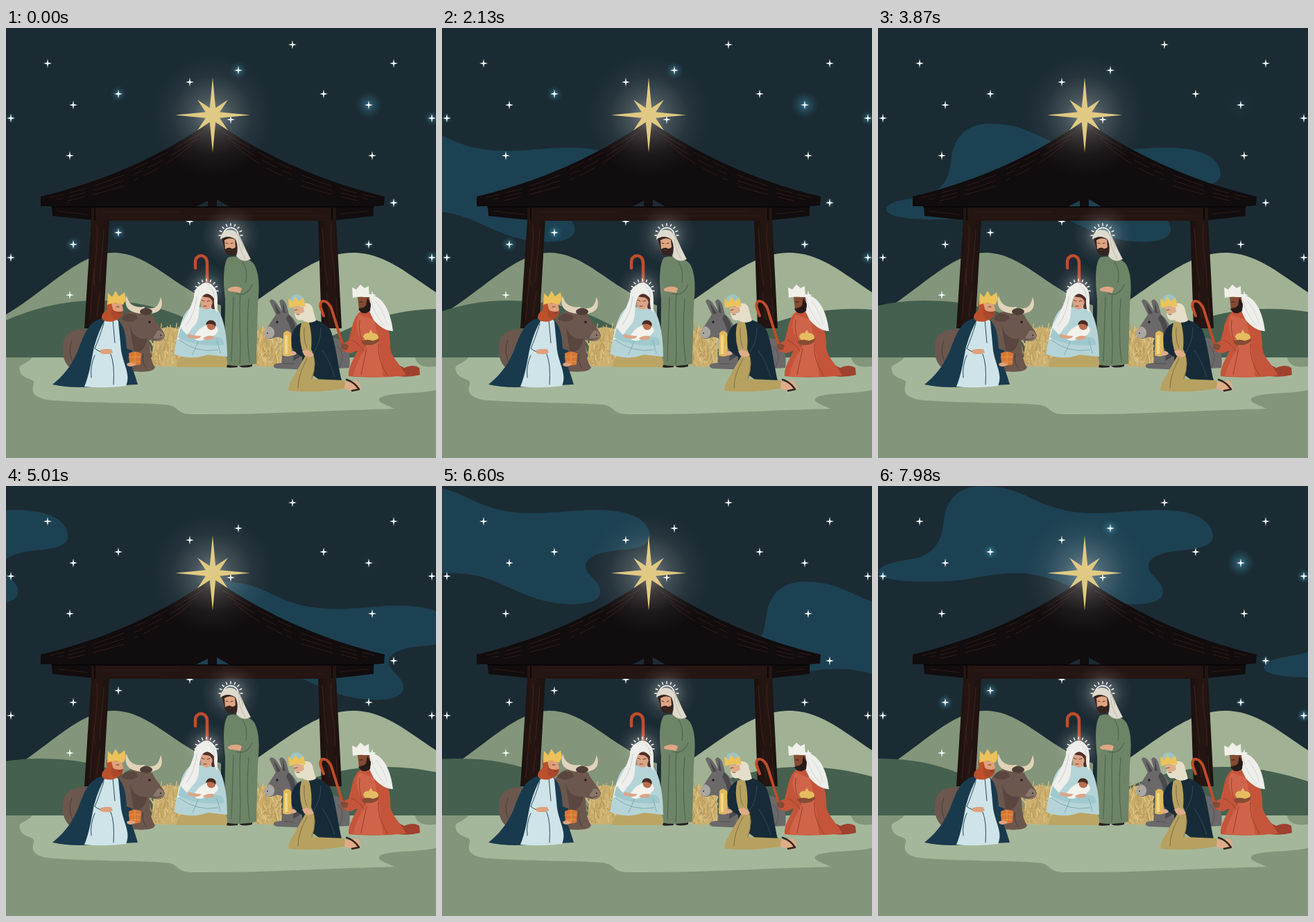
Recreate the animation shown at these times as an HTML page. Size 620 px wide and 620 px high, loop 8 s.

```html
<!DOCTYPE html>
<html lang="en">
<head>
<meta charset="utf-8">
<title>Nativity night</title>
<style>
html,body{margin:0;width:100%;height:100%;overflow:hidden;background:#1b2b33}
svg{display:block;width:100vw;height:100vh}
.ln{fill:none;stroke-linecap:round;stroke-linejoin:round}
</style>
</head>
<body>
<svg viewBox="0 0 620 620">
<defs>
  <radialGradient id="white"><stop offset="0" stop-color="#fff" stop-opacity=".8"/><stop offset=".3" stop-color="#eee" stop-opacity=".38"/><stop offset=".65" stop-color="#ccc" stop-opacity=".12"/><stop offset="1" stop-color="#aaa" stop-opacity="0"/></radialGradient>
  <radialGradient id="blue"><stop offset="0" stop-color="#4f9fbc" stop-opacity=".75"/><stop offset=".45" stop-color="#357f9c" stop-opacity=".38"/><stop offset="1" stop-color="#2a6580" stop-opacity="0"/></radialGradient>
  <linearGradient id="wood"><stop offset="0" stop-color="#1a100e"/><stop offset=".5" stop-color="#261612"/><stop offset="1" stop-color="#1c1210"/></linearGradient>
  <path id="cloud" d="M150 0C118 0 99 18 95 48C92 78 84 96 55 104C28 109 0 113 1 124C3 139 62 139 105 137C145 134 165 124 207 126C270 129 292 165 360 170C392 172 411 166 411 152C411 137 391 130 390 116C390 99 418 94 446 92C470 89 483 84 483 72C481 48 455 37 420 35C370 32 330 44 280 37C222 28 210 0 150 0Z"/>
  <path id="spark" d="M0-6.5L1-1.2L6 0L1 1.2L0 6.5L-1 1.2L-6 0L-1-1.2Z"/>
</defs>

<rect width="620" height="620" fill="#1b2b33"/>
<g fill="#1c4152"><use id="low" href="#cloud"/><use id="high" href="#cloud"/></g>

<!-- land -->
<path fill="#83957a" d="M0 413C60 378 105 324 155 324C208 324 245 378 310 400V476H0Z"/>
<path fill="#a1b193" d="M330 412C390 380 440 324 500 324C546 324 578 354 620 381V476H330Z"/>
<g id="hills" fill="#45604f">
  <path d="M-60 450C0 419 58 393 130 393C200 393 245 408 300 440L330 476H-60Z"/>
  <path d="M410 476C480 437 540 405 628 405C690 405 740 420 790 440V476Z"/>
</g>
<rect y="475" width="620" height="145" fill="#83957a"/>
<path fill="#a5b79a" d="M38 475C30 486 17 483 20 494C23 508 42 504 40 513C37 523 36 534 68 537C130 541 185 540 230 543C252 545 243 557 270 557C365 558 450 552 561 549C545 542 531 538 541 532C560 525 596 528 620 522V488C602 490 592 486 590 475Z"/>
<g id="sky"></g>

<!-- stable -->
<g fill="url(#wood)">
  <path d="M123 276H149L140 433H113Z"/>
  <path d="M450 276H476L484 433H455Z"/>
</g>
<g class="ln" stroke="#432219" stroke-width="1">
  <path d="M131 285C134 320 124 350 128 372M141 290C139 325 136 338 135 365M127 345L121 420M136 380L131 415M456 288C459 320 458 338 464 371M469 284C465 315 476 343 474 375M462 382L467 420M476 390L478 425"/>
</g>
<path fill="#110c0d" fill-rule="evenodd" d="M298 133C313 143 338 160 374 179C429 208 484 228 546 243L545 256L530 257V271L476 277H126L67 271L66 257L50 257V243C112 228 167 208 222 179C258 160 283 143 298 133ZM273 258L291 249V258ZM304 247V258H323Z"/>
<path fill="#241512" d="M123 259H476V278H123Z"/>
<path class="ln" stroke="#070506" stroke-width="1.5" d="M66 258H530M128 259V277M470 259V277"/>
<path class="ln" stroke="#301a16" d="M140 265H250M270 271H460M150 273H225M330 264H440M75 264L118 269M482 268L522 264"/>
<g id="grain" class="ln" stroke="#331c18" stroke-dasharray="46 13 24 9"></g>

<circle cx="298" cy="126" r="88" fill="url(#white)" opacity=".55"/>
<path id="bigStar" fill="#e0ca83"/>

<g id="hay" class="ln" stroke-width="1.2"></g>

<!-- ox -->
<g>
  <path fill="#6b574d" d="M82 468C80 442 92 434 118 434H160C164 413 175 407 195 408L211 414C216 426 228 436 229 443C227 454 216 453 206 448C209 465 206 475 215 489C213 497 195 496 178 495H105C90 493 83 481 82 468Z"/>
  <path fill="#59473f" d="M188 414C177 409 170 412 167 420C177 426 184 423 190 419ZM178 428C183 444 190 449 204 448C201 462 194 470 184 466Z"/>
  <path fill="#8b766b" d="M219 436C228 436 231 445 225 450C219 453 212 450 213 445Z"/>
  <path fill="#e0d3b9" d="M197 412C177 411 169 402 174 386C177 400 187 404 200 402ZM207 412C223 411 228 402 223 388C220 402 215 405 205 404Z"/>
  <ellipse cx="202" cy="409" rx="9" ry="5" fill="#4f3e38"/>
  <circle cx="207" cy="424" r="1.8" fill="#231917"/><circle cx="223" cy="443" r="1" fill="#2c201d"/>
  <path class="ln" stroke="#4c3c36" d="M214 449Q219 450 224 447M198 470Q195 480 202 491M95 450Q87 469 100 488"/>
</g>

<!-- donkey -->
<g>
  <path fill="#6a6869" d="M389 413L380 394Q382 388 389 395L398 408L394 394Q398 387 404 398L408 413C420 421 424 444 440 447H475C492 451 498 470 495 490L440 493L391 491C382 489 385 483 397 483L401 450C395 444 388 445 383 448C373 449 370 439 375 435Z"/>
  <path fill="#4a494c" d="M386 396L396 411L391 413ZM399 394L403 411L399 410ZM407 413C422 424 416 449 426 473L414 480C416 455 413 434 404 419Z"/>
  <path fill="#aaa6a2" d="M379 430C388 432 390 442 383 447C373 449 370 440 375 435Z"/>
  <circle cx="391" cy="424" r="1.7" fill="#201e20"/><circle cx="377" cy="440" r=".9" fill="#333"/>
  <path class="ln" stroke="#505053" d="M478 459Q491 470 481 489M400 484H415"/>
</g>

<!-- shepherd's crook and standing father -->
<path class="ln" stroke="#bf4c2b" stroke-width="4.5" d="M290 374V339C290 325 273 325 273 338V346"/>
<circle cx="324" cy="299" r="43" fill="url(#white)" opacity=".72"/>
<g id="haloA" class="ln" stroke="#fff" stroke-width="1.4"></g>
<g>
  <path fill="#252020" d="M315 485H334V489Q320 491 315 488ZM337 484H355V488Q342 491 337 488Z"/>
  <path fill="#6d8467" d="M320 331C334 327 352 332 358 341C365 354 366 372 363 400L361 484Q338 490 315 485L316 390C313 365 313 340 320 331Z"/>
  <path class="ln" stroke="#4f674d" stroke-width="1.2" d="M338 382C335 420 340 455 337 484M355 370Q347 388 332 383M328 388L325 480M350 391Q346 440 351 481M341 337Q349 349 346 367"/>
  <path fill="#35231f" d="M311 304Q318 294 331 303L335 320Q332 329 323 328Q316 326 315 318Z"/>
  <path fill="#dfa684" d="M315 306Q322 301 330 305L331 316Q326 320 324 317Q320 316 316 319Z"/>
  <path fill="#dedacd" d="M309 305C309 289 329 286 337 300C344 315 348 325 353 333Q342 340 332 329Q336 316 331 305Q320 297 309 305Z"/>
  <path class="ln" stroke="#bdb9ab" d="M335 305Q337 321 345 333M330 293Q339 301 342 318"/>
  <path class="ln" stroke="#523027" d="M317 310L320 311M324 311L327 310M320 320.500L324 320.500"/>
  <path fill="#dfa684" d="M340 375Q329 370 320 376Q319 380 326 380L338 382Z"/>
</g>

<!-- mother and child -->
<circle cx="289" cy="377" r="37" fill="url(#white)" opacity=".75"/>
<g id="haloB" class="ln" stroke="#fff" stroke-width="1.4"></g>
<g>
  <path fill="#bba565" d="M255 470Q245 480 246 489H318Q322 480 313 466Z"/>
  <path fill="#b5d4d7" d="M267 403C252 411 248 441 242 470Q266 480 291 471L319 474C319 447 315 415 302 402Z"/>
  <path fill="#dca386" d="M280 385Q292 379 299 388L296 402Q291 409 282 403Z"/>
  <path fill="#513027" d="M279 386Q289 377 300 387L301 405Q293 407 298 396Q296 387 287 388Z"/>
  <path fill="#eeeeea" d="M271 388C270 369 292 363 302 376C307 386 304 401 305 410Q299 407 300 390Q291 378 283 387C274 405 284 419 268 433Q259 448 247 449C248 426 263 416 271 388Z"/>
  <path class="ln" stroke="#c7d0cf" d="M275 387Q273 411 260 428M293 372Q302 380 300 389"/>
  <path class="ln" stroke="#6c382f" d="M282 392L286 394M290 394L294 393M285 401L289 401"/>
  <path fill="#a0c9ce" d="M252 432Q262 447 274 448L303 445Q316 446 314 457Q290 460 264 453Q252 449 248 446Z"/>
  <path class="ln" stroke="#80adb3" d="M250 450Q274 469 306 464M278 450L269 471M304 450L309 469"/>
  <path fill="#f3f2ec" d="M271 446C276 433 286 430 292 427Q304 426 306 436Q302 446 287 449Q275 454 271 446Z"/>
  <circle cx="296" cy="429" r="6.500" fill="#b96f4f"/><path fill="#472a22" d="M288 428Q290 419 299 422Q304 425 302 430Q296 424 288 428Z"/>
  <path fill="#dca386" d="M263 441Q271 444 281 444Q281 448 273 448L262 446ZM299 444Q288 443 284 448Q289 451 300 448Z"/>
</g>

<!-- left king -->
<g>
  <path fill="#193a4d" d="M141 418C119 422 113 442 106 459C97 485 83 501 67 514Q94 520 126 517L190 514C184 494 180 484 176 474Q185 479 182 465L174 462C173 440 169 424 157 418Z"/>
  <path fill="#cfe4e9" d="M143 421Q157 414 162 423L166 465C170 488 180 499 173 516Q143 520 113 517C121 497 122 484 127 460Q134 435 143 421Z"/>
  <path class="ln" stroke="#28495a" d="M141 426Q134 449 128 462Q136 469 150 469M154 421L157 454M151 470Q157 485 155 514M128 472Q121 487 123 504"/>
  <path fill="#bb502d" d="M147 393C141 399 150 405 141 410Q135 417 141 422Q154 426 162 419L167 394Z"/>
  <path fill="#dfa17c" d="M152 397H167L169 407Q164 415 155 409Z"/>
  <path fill="#aa482b" d="M152 404Q157 411 169 408Q168 419 159 420Q150 418 152 404Z"/>
  <path fill="#ecc15a" d="M146 399L147 382L153 388L158 379L163 387L171 381L173 391L169 399Q158 394 146 399Z"/>
  <path class="ln" stroke="#6b372a" d="M159 402L163 402M162 411L166 411"/>
  <path fill="#dfa17c" d="M136 464Q145 462 152 463L154 468Q146 472 136 469Z"/>
  <path fill="#d77736" d="M177 469Q186 464 195 469L194 485Q185 488 178 485Z"/>
  <path class="ln" stroke="#e29a4c" d="M178 474H194M186 468V486M180 481H193"/>
  <path fill="#dfa17c" d="M174 484Q181 480 187 485Q182 490 175 487Z"/>
</g>

<!-- middle king -->
<g>
  <path fill="#162b37" d="M431 424C416 426 412 440 410 454Q412 467 427 474L428 490L454 509L484 508C479 490 475 450 467 434Q456 421 440 420Z"/>
  <path fill="#b7a160" d="M426 425Q421 443 427 464L432 472L412 507Q406 517 408 523Q450 527 492 519L488 508L441 506Q450 483 440 463Q442 440 436 422Z"/>
  <path class="ln" stroke="#7e6e42" d="M430 432Q429 452 434 461M434 477Q421 500 421 519M442 469Q449 481 441 506"/>
  <path class="ln" stroke="#304b57" d="M454 432Q454 455 442 470M456 465Q467 480 474 503"/>
  <path fill="#e5dfc9" d="M428 397Q442 395 443 408L447 422Q437 428 427 421Q418 424 416 411Z"/>
  <path fill="#dfac89" d="M414 402H429L430 409Q424 414 416 411Z"/>
  <path fill="#9dc3c2" d="M409 394Q410 383 421 384Q431 387 429 397Z"/>
  <path fill="#ebc35b" d="M408 404L407 390L413 395L417 387L422 394L429 389L432 402Q419 399 408 404Z"/>
  <path class="ln" stroke="#72463a" d="M416 407L420 406M419 413L423 413"/>
  <path fill="#e2b95c" d="M400 440Q405 433 411 440L412 472Q406 475 399 472Z"/>
  <path fill="#f0d58c" d="M402 443H406V470H402Z"/>
  <path fill="#dfac89" d="M427 466Q436 461 444 471Q439 477 430 472ZM409 466Q418 465 419 470Q413 474 409 471ZM489 509Q497 514 504 507Q513 513 511 521Q500 525 488 520Z"/>
  <path class="ln" stroke="#34251f" stroke-width="2.500" d="M491 507Q503 511 509 521L499 523"/>
</g>

<!-- right king -->
<g>
  <path class="ln" stroke="#bf4c2b" stroke-width="4" d="M488 465L470 407C465 390 450 390 454 404L458 415"/>
  <path fill="#9e412e" d="M551 478L574 490Q587 484 596 490L597 500Q579 505 558 501Z"/>
  <path fill="#c4553a" d="M511 409C499 418 499 436 494 451L484 456Q485 468 497 469L507 465C499 481 493 491 494 502Q535 506 577 501C569 485 554 474 554 459C555 433 545 417 529 410Z"/>
  <path fill="#d0644a" d="M509 413Q501 431 512 449L519 459C508 479 502 491 501 502L544 503Q541 482 538 458L531 421Z"/>
  <path class="ln" stroke="#973f30" d="M510 421Q507 443 518 459M537 456Q535 478 550 501M520 462L512 500M498 450Q510 455 516 466"/>
  <path fill="#eeeeea" d="M514 388Q524 380 533 387C548 394 556 417 558 437Q544 437 530 421L521 402Z"/>
  <path class="ln" stroke="#d8d9d2" d="M526 393Q531 412 546 430M533 394Q546 410 549 427"/>
  <path fill="#854b34" d="M507 388H524L526 402Q519 413 509 406Z"/>
  <path fill="#251c1a" d="M521 389L526 398L525 408Q514 416 508 405Q514 405 519 400Z"/>
  <path fill="#f0f0e9" d="M500 389L499 374L505 377L511 370L517 375L523 372L524 388Q513 386 500 389Z"/>
  <path class="ln" stroke="#2c1916" d="M510 395L514 395M510 404L514 404"/>
  <path fill="#e5bd60" d="M515 445Q517 439 523 440L526 435L529 440Q537 440 537 447Q533 453 526 452Q518 453 515 445Z"/>
  <path fill="#854b34" d="M513 451Q522 448 529 451L538 448Q537 456 526 457Q517 458 513 454ZM483 456Q490 453 494 458L492 464Q486 465 483 461Z"/>
</g>
</svg>
<script>
const $ = id => document.getElementById(id);
const LOOP = 8000, STEP = 30, SPEED = .1325;

// Small repeatable generator for straw
let seed = 17;
const rnd = () => (seed = seed * 16807 % 2147483647) / 2147483647;

// x, y and, for twinkling stars, the glow radius
const stars = [[60,51],[97,111],[162,95,12],[265,78],[335,61,13],[413,24],[458,95],[559,51],
  [523,111,20],[7,130,7],[614,130,11],[92,184],[528,184],[559,252,7],[7,331,6],[97,312,12],
  [162,295,12],[265,279],[523,312,7],[614,331,11],[92,385],[528,385],[324,132]];
$('sky').innerHTML = '<g id="glows">' +
  stars.filter(s => s[2]).map(([x, y, r]) => `<circle cx="${x}" cy="${y}" r="${r}" fill="url(#blue)"/>`).join('') +
  '</g><g fill="#f6fbfa">' + stars.map(([x, y]) => `<use href="#spark" x="${x}" y="${y}"/>`).join('') + '</g>';

let ray = '';
for (let i = 0; i < 16; i++) {
  const a = i * Math.PI / 8, r = i % 2 ? 11 : i % 4 ? 31 : 54;
  ray += (i ? 'L' : 'M') + (298 + r * Math.sin(a)) + ' ' + (125.5 - r * Math.cos(a));
}
$('bigStar').setAttribute('d', ray + 'Z');

function halo(id, x, y, r) {
  let d = `M${x - r} ${y}A${r} ${r} 0 0 1 ${x + r} ${y}`;
  for (let i = 0; i < 9; i++) {
    const a = Math.PI * (1 + i / 8), c = Math.cos(a), s = Math.sin(a);
    d += `M${x + (r + 3) * c} ${y + (r + 3) * s}L${x + (r + 6) * c} ${y + (r + 6) * s}`;
  }
  $(id).innerHTML = `<path d="${d}"/>`;
}
halo('haloA', 324, 299, 11);
halo('haloB', 289, 379, 11);

let grain = '';
for (const side of [-1, 1]) for (let i = 0; i < 3; i++) {
  const p = (x, y) => `${298 + side * x} ${y}`;
  grain += `M${p(14 + i * 8, 150 + i * 9)}Q${p(62, 179 + i * 9)} ${p(113, 203 + i * 8)}` +
    `M${p(128, 212 + i * 8)}Q${p(180, 233 + i * 5)} ${p(234 - i * 10, 244 + i * 3)}`;
}
$('grain').innerHTML = `<path d="${grain}"/>`;

function straw(x, w) {
  let out = `<path fill="#cbb070" d="M${x + 5} 438Q${x + w / 2} 426 ${x + w - 2} 435L${x + w} 486Q${x + w / 2} 491 ${x} 486Z"/>`;
  const tones = ['#e0c98b', '#b59759', '#d6bb7c', '#c0a363'];
  for (let i = 0; i < 130; i++) {
    const a = x + rnd() * w, b = 435 + rnd() * 52, lean = (rnd() - .5) * 12;
    out += `<path stroke="${tones[i % 4]}" d="M${a} ${b}q${lean} -3 ${lean} -${5 + rnd() * 7}"/>`;
  }
  return out;
}
$('hay').innerHTML = straw(209, 44) + straw(357, 41);

const glowKeys = [[0, .75], [2130, .8], [3870, .12], [5010, .05], [5850, 0], [7260, 0], [7980, .9], [8000, .9]];
function glow(t) {
  const i = glowKeys.findIndex(k => k[0] > t);
  const [a, u] = glowKeys[i - 1], [b, v] = glowKeys[i];
  return u + (v - u) * (t - a) / (b - a);
}

const move = (id, x, y) => $(id).setAttribute('transform', `translate(${x} ${y})`);
function draw(t) {
  move('low', 11 + SPEED * (t - 3870), 138);
  move('high', SPEED * (t - 7980), 0);
  move('hills', -.0165 * t, 0);
  $('glows').setAttribute('opacity', glow(t));
}
function tick() {
  draw(Math.floor(performance.now() % LOOP / STEP) * STEP);
  requestAnimationFrame(tick);
}
tick();
</script>
</body>
</html>
```
